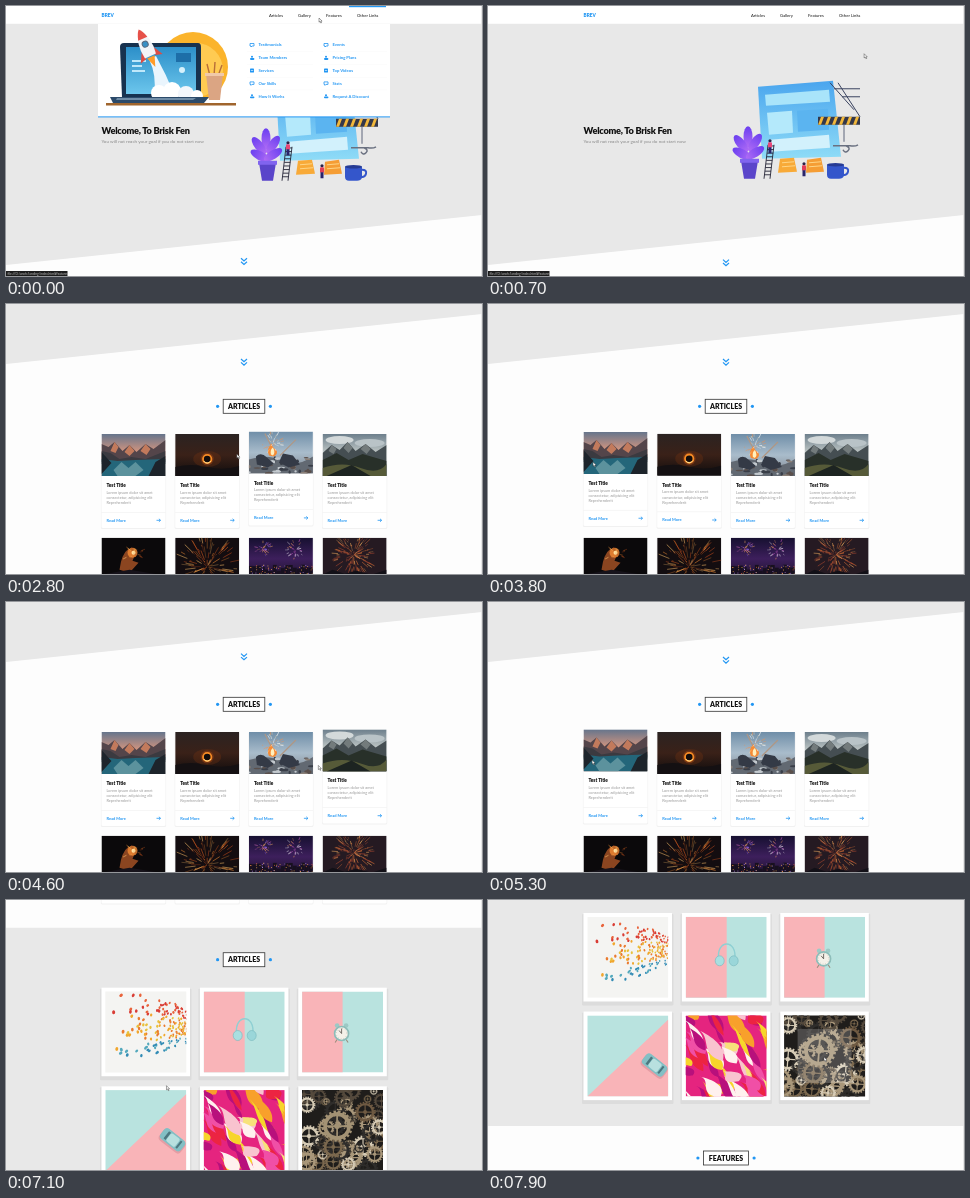
Write an HTML page that moves like this. It is 476 px wide and 270 px high and loops after 8000 ms.

```html
<!DOCTYPE html>
<html lang="en">
<head>
<meta charset="utf-8">
<title>Landing page tour</title>
<style>
html, body { margin: 0; width: 100%; height: 100%; overflow: hidden; background: #fdfdfd; }
svg { display: block; }
#stage { width: 100vw; height: 100vh; }
text { font-family: Lato, "Open Sans", sans-serif; }
</style>
</head>
<body>
<svg id="stage" viewBox="0 0 476 270"></svg>
<script>
const LOOP = 8000, BLUE = '#2196f3';
const PINK = '#f9b4b8', MINT = '#b9e3df';

let seed = 7;
const rnd = (a = 1, b = 0) => {
  seed = (seed * 16807) % 2147483647;
  return b + (a - b) * seed / 2147483647;
};
const pick = list => list[Math.floor(rnd(list.length))];
const times = (n, fn) => Array.from({ length: n }, (_, i) => fn(i)).join('');
const clamp = v => Math.max(0, Math.min(1, v));
const smooth = v => { v = clamp(v); return v * v * (3 - 2 * v); };

const rect = (x, y, w, h, fill, more = '') =>
  `<rect x="${x}" y="${y}" width="${w}" height="${h}" fill="${fill}" ${more}/>`;
const circle = (x, y, r, fill, more = '') =>
  `<circle cx="${x}" cy="${y}" r="${r}" fill="${fill}" ${more}/>`;
const oval = (x, y, rx, ry, fill, more = '') =>
  `<ellipse cx="${x}" cy="${y}" rx="${rx}" ry="${ry}" fill="${fill}" ${more}/>`;
const path = (d, fill, more = '') => `<path d="${d}" fill="${fill}" ${more}/>`;
const line = (d, stroke, w = 1, more = '') =>
  path(d, 'none', `stroke="${stroke}" stroke-width="${w}" ${more}`);
const text = (x, y, size, str, fill = '#111', more = '') =>
  `<text x="${x}" y="${y}" font-size="${size}" fill="${fill}" ${more}>${str}</text>`;
const BOLD = 'font-weight="700"', BLACK = 'font-weight="900"';
const group = (id, body) => `<g id="${id}">${body}</g>`;
const gradient = (id, ...stops) => `<linearGradient id="${id}" x2="0" y2="1">` +
  stops.map((c, i) => `<stop offset="${i / (stops.length - 1)}" stop-color="${c}"/>`).join('') +
  '</linearGradient>';

const defs = `<defs>${
  gradient('dusk', '#66758c', '#e59a7c', '#a8604f')}${
  gradient('cloud', '#6d7f8c', '#c9cfcc', '#6f7f80')}${
  gradient('frost', '#6f8ea8', '#a9bccb', '#80868e')}${
  gradient('ember', '#2b2322', '#3a2118', '#0f0c0d')}${
  gradient('night', '#161030', '#3d1f5c', '#1a1226')}${
  gradient('glass', '#4aa5ee', '#8fdcf7')}${
  gradient('screen', '#2c8fc9', '#6cc6ec')}${
  gradient('leaf', '#6a3ff0', '#b06cf5')}</defs>`;

// Pictures for the article cards, each 64 x 42
const sparks = (cx, cy, n, r, colors) => times(n, () => {
  const a = rnd(6.283), r0 = rnd(r * .7), r1 = r0 + rnd(r * .35, 1);
  const c = Math.cos(a), s = Math.sin(a);
  return line(`M${cx + c * r0} ${cy + s * r0}L${cx + c * r1} ${cy + s * r1}`, pick(colors), rnd(.6, .25));
});
const FIRE = ['#f08a32', '#d95d1f', '#ffc26b', '#a8431c'];

const lake = () => rect(0, 0, 64, 42, 'url(#dusk)') +
  path('M0 10L7 13 13 8 21 17 28 11 35 18 44 10 52 15 64 6V28H0Z', '#54454a') +
  path('M13 8L17 13 14 19 9 17ZM28 11L33 17 28 22 23 18ZM44 10L49 15 45 21 39 17Z', '#c27a5c') +
  path('M0 17L9 19 18 25 30 23 44 25 64 17V30H0Z', '#3b3a40') +
  path('M0 25L16 27 34 26 64 25V42H0Z', '#24667a') +
  path('M12 36L20 28 27 34 34 28 42 36 34 42H16Z', '#6fa0a8', 'opacity=".75"') +
  path('M64 22L54 28 47 42H64ZM0 18L10 29 0 40Z', '#1d242b');
const eclipse = () => rect(0, 0, 64, 42, 'url(#ember)') +
  path('M0 33Q16 29 32 33T64 32V42H0Z', '#141012') +
  oval(32, 25, 14, 8, '#7a3512', 'opacity=".3"') + circle(32, 25, 6.5, '#9a4515', 'opacity=".5"') +
  circle(32, 25, 4.2, '#120c0b', 'stroke="#f58a24" stroke-width="1.8"') +
  line('M28.5 27A4 4 0 0 0 35.5 27', '#ffdf94', 1);
const camp = () => rect(0, 0, 64, 42, 'url(#frost)') +
  path('M0 28Q18 22 33 29T64 25V42H0Z', '#626972') +
  times(40, () => oval(rnd(64), rnd(42, 24), rnd(4, 1), rnd(2, .7), pick(['#393e48', '#8b8078', '#c3c9ce', '#5a4f4b']))) +
  path('M7 25Q12 20 18 26L25 32 19 36 8 33ZM34 22L44 24 51 33 40 36 30 31Z', '#343a46') +
  line('M16 2L25 20M47 8L31 24', '#b09784', 1.2) +
  path('M20 24Q17 17 23 12 23 16 27 18 30 22 25 25Z', '#f58b35') +
  path('M22 23Q21 18 24 16 27 21 24 24Z', '#fff0be') + sparks(24, 12, 30, 14, ['#ffe2b8', '#f68d45', '#fff']);
const hills = () => rect(0, 0, 64, 42, 'url(#cloud)') +
  oval(17, 6, 14, 4, '#d3d9da') + oval(47, 9, 15, 4, '#b9c3c7') +
  path('M0 19L9 11 17 16 25 8 33 17 43 10 53 18 64 11V42H0Z', '#454e52') +
  path('M9 11L14 15 11 20 6 17ZM25 8L30 14 26 19 21 14ZM43 10L48 15 44 20 38 15Z', '#737b7c') +
  path('M0 26L14 19 26 26 40 20 64 27V42H0Z', '#283029') +
  path('M0 34Q20 27 38 34T64 30V42H0Z', '#565a38') + path('M4 42L29 31 48 42Z', '#1d2421');
const hand = () => rect(0, 0, 64, 42, '#0b090b') +
  path('M18 32Q20 16 27 11L34 16 31 23 37 25 28 35Z', '#8b4520') +
  circle(31, 15, 5, '#f28a35', 'opacity=".8"') + circle(32, 15, 2, '#ffe1a0') + sparks(32, 16, 16, 13, FIRE) +
  path('M0 37L28 32 64 38V42H0Z', '#17131b');
const streaks = () => rect(0, 0, 64, 42, '#130d10') + sparks(32, 29, 110, 38, FIRE);
const city = () => rect(0, 0, 64, 42, 'url(#night)') +
  sparks(14, 11, 28, 11, ['#e46fc3', '#ffb15e', '#8c67e8']) +
  sparks(47, 12, 32, 12, ['#f7a25f', '#d25aca', '#fff']) +
  times(16, i => rect(i * 4, rnd(34, 27), 3.8, 16, '#17101f')) +
  times(70, () => rect(rnd(64), rnd(38, 27), .8, .8, pick(['#ffb54d', '#e96545', '#b889e8'])));
const burst = () => rect(0, 0, 64, 42, '#251a22') + sparks(31, 17, 120, 25, ['#e77738', '#ffb765', '#b74c32']) +
  path('M0 37L10 32 22 36 34 33 49 37 64 32V42H0Z', '#121017');

// Pictures for the gallery, each 81 x 81
const confetti = () => rect(0, 0, 81, 81, '#f4f4f2') + times(210, () => {
  const u = rnd() ** .38, v = rnd();
  const x = 2 + 79 * u, y = (4 + 13 * u * u) * (1 - v) + (78 - 30 * u) * v, r = 2 - 1.1 * u;
  const color = pick(v < .3 ? ['#d93c35', '#e9643c'] : v < .8 ? ['#f1a62d', '#e8c13c', '#ea7b30'] : ['#328bb5', '#54a9bd']);
  return oval(x, y, r * .75, r, color, `transform="rotate(${rnd(50, -20)} ${x} ${y})"`);
});
const split = x => rect(0, 0, 81, 81, MINT) + rect(0, 0, x, 81, PINK);
const headphones = () => split(41) +
  line('M33 43C30 22 52 22 49 43', '#8fd0d3', 1.4) +
  oval(34, 44, 4.5, 5, '#a9dfe0', 'stroke="#7dbcc0" stroke-width=".7"') +
  oval(48, 44, 4.5, 5, '#9ad6d9', 'stroke="#7dbcc0" stroke-width=".7"');
const clock = () => split(40.5) + line('M35 48L33 51M44 48L46 51', '#9b8c7c', 1.1) +
  circle(35, 34, 2.3, '#9dc9c5') + circle(44, 34, 2.3, '#9dc9c5') +
  circle(39.5, 42, 7, '#f4f1e9', 'stroke="#8dbdb9" stroke-width="1.7"') +
  circle(39.5, 42, 5.3, 'none', 'stroke="#94897c" stroke-width=".6" stroke-dasharray=".5 2.3"') +
  line('M37 39L39.5 42V37', '#554d48', .8);
const car = () => rect(0, 0, 81, 81, MINT) + path('M0 81L81 4V81Z', PINK) +
  `<g transform="translate(67 50) rotate(38)">${rect(-13, -6, 27, 14, '#d58b94', 'rx="4" opacity=".55"') +
  rect(-13, -7, 26, 13, '#83bfc4', 'rx="4"') + rect(-5, -5.5, 11, 10, '#b8e0df', 'rx="2"') +
  rect(-8, -5, 2.5, 9, '#4c777f') + rect(7, -5, 2, 9, '#4c777f')}</g>`;
const paint = () => rect(0, 0, 81, 81, '#e5247f') + times(60, () => {
  const x = rnd(85, -10), y = rnd(75, -15), w = rnd(13, 3), h = rnd(40, 12);
  return path(`M${x} ${y}c${w} ${h * .3} ${-w} ${h * .6} ${w} ${h}c${w} ${-h * .3} 0 ${-h * .7} ${-w} ${-h}`,
    pick(['#f7d52b', '#f8a02b', '#f04fa6', '#b8107c', '#fff1ee', '#f9c3cf', '#ec2442', '#f7e27a']),
    `transform="rotate(-24 ${x} ${y})"`);
});
const gear = (x, y, r, c) =>
  circle(x, y, r, 'none', `stroke="${c}" stroke-width="${r * .3}"`) +
  circle(x, y, r * 1.2, 'none', `stroke="${c}" stroke-width="${r * .22}" stroke-dasharray="${r * .2} ${r * .18}"`) +
  circle(x, y, r * .25, c) + line(`M${x - r} ${y}H${x + r}M${x} ${y - r}V${y + r}`, c, r * .14);
const gears = () => rect(-8, -8, 97, 97, '#1f1d1b') +
  times(46, () => gear(rnd(81), rnd(81), rnd(9, 2.5), pick(['#7b684e', '#a9977a', '#554a3d', '#d6cbb5', '#2f2d2b']))) +
  gear(35, 36, 12, '#a39274') + gear(63, 22, 8, '#6f5a42');

// Page layout
const cards = [lake, eclipse, camp, hills, hand, streaks, city, burst].map((art, i) =>
  ({ art, id: 'card' + i, x: 95.5 + 73.7 * (i % 4), y: 329 + 103.7 * (i >> 2), w: 64, h: 94 }));
const photos = [confetti, headphones, clock, car, paint, gears].map((art, i) =>
  ({ art, id: 'photo' + i, x: 95.5 + 98.4 * (i % 3), y: 611 + 98.6 * (i / 3 | 0), w: 88.5, h: 88.5 }));

const cardSvg = ({ art, id, x, y, w, h }) => group(id,
  rect(x - .6, y, w + 1.2, h + 1, '#f1f1f1', 'rx="1.5"') + rect(x, y, w, h, '#fff', 'rx="1.5"') +
  `<svg x="${x}" y="${y}" width="64" height="42">${art()}</svg>` +
  text(x + 5, y + 53, 4.7, 'Test Title', '#111', BLACK) +
  ['Lorem ipsum dolor sit amet', 'consectetur, adipisicing elit', 'Reprehenderit']
    .map((s, i) => text(x + 5, y + 59.7 + i * 5.1, 3.9, s, '#999')).join('') +
  rect(x, y + 78, w, .4, '#e8e8e8') +
  text(x + 5, y + 87.6, 4, 'Read More', BLUE, BOLD) +
  line(`M${x + 55} ${y + 86.3}h4m-1.6-1.5l1.6 1.5-1.6 1.5`, BLUE, .8));

const photoSvg = ({ art, id, x, y, w, h }) =>
  rect(x - 1.5, y + 1, w + 3, h + 3, '#dcdcdc', 'rx="1"') + rect(x, y, w, h, '#fff') +
  `<svg x="${x + 3.8}" y="${y + 3.8}" width="81" height="81">${group(id, art())}
  ${rect(0, 0, 0, 0, '#fff', `id="${id}flash"`)}</svg>`;

const heading = (y, str, half = 20.8) =>
  rect(238 - half, y - 7, half * 2, 14, '#fff', 'stroke="#333" stroke-width=".8"') +
  text(238, y + 2.6, 7, str, '#111', BLACK + ' text-anchor="middle"') +
  circle(238 - half - 5.6, y, 1.6, BLUE) + circle(238 + half + 5.6, y, 1.6, BLUE);

const person = (x, y, shirt) => circle(x, y, 1.6, '#2a2146') +
  rect(x - 2, y + 1.5, 4, 5.5, shirt, 'rx="1"') + rect(x - 1.5, y + 6.5, 3, 6, '#29246b');

const hero = path('M270 82L345 76 353 152 274 154Z', 'url(#glass)') +
  path('M277 90L341 85 342 97 278 101Z', '#a9e4fa') +
  path('M279 108L304 106 305 128 281 130Z', '#b4e9fb') + path('M309 106L340 104 341 125 310 127Z', '#5bb4f0') +
  path('M282 135L341 130 342 143 283 147Z', '#d2f1fc') +
  line('M342 78L366 105M350 78L372 112M346 84L372 84M354 92L372 92', '#3b4460', 1) +
  rect(330, 112, 42, 8, '#35384a') +
  times(6, i => path(`M${333 + i * 7} 112h3l-3 8h-3Z`, '#f2b83c')) +
  line('M356 120V137', '#3b4460', .8) +
  line('M345 141H362q5 1 8-1M358 141q5 2 2 5t-5-1', '#6a7080', 1.5) +
  [[260, 132, 0], [253, 139, -38], [267, 138, 35], [254, 149, -62], [267, 148, 58]].map(([x, y, a]) =>
    oval(x, y, 4.5, 10.5, 'url(#leaf)', `transform="rotate(${a} ${x} ${y})"`)).join('') +
  path('M253 156H270L267 174H256Z', '#5a45ca') + rect(252, 154, 19, 4, '#8064ef') +
  line('M276 174L280 140M282 174L286 140' + times(9, i => `M${276.5 + i * .45} ${170 - i * 3.6}h6`), '#252537', .9) +
  person(282, 136, '#e84878') +
  path('M292 154L306 153 309 167 290 168Z', '#f8aa38') + path('M319 155L333 153 336 167 318 168Z', '#f59d34') +
  line('M294 158L306 157M294 162L307 161M321 158L333 157M321 162L334 161', '#ffd585', 1) +
  person(316, 159, '#e13d58') +
  path('M339 160H356V171Q355 174 351 174H343Q339 174 339 170Z', '#3456cb') +
  line('M356 163q5 0 4 4t-5 3', '#3456cb', 2) + oval(347.5, 160, 8.5, 1.7, '#263b94');

const launch = circle(187, 61, 35, '#fbb42c') + circle(190, 64, 27, '#ffcb52') +
  path('M118 37H192Q195 37 195 41V91H116L114 41Q114 37 118 37Z', '#17324f') +
  rect(120, 41, 70, 47, 'url(#screen)') +
  rect(126, 54, 14, 2, '#bfe8fa') + rect(126, 59, 10, 2, '#bfe8fa') + rect(126, 64, 13, 2, '#bfe8fa') +
  rect(170, 47, 15, 9, '#1d6ea8') + circle(176, 64, 3, '#d6f1fc') +
  path('M148 88Q151 70 143 53L150 50Q160 68 168 88Z', '#eaf5fd') +
  circle(153, 87, 8, '#fff') + circle(166, 85, 9, '#fff') + circle(180, 88, 8, '#f3f7fc') + circle(191, 90, 6, '#fff') +
  path('M104 91H203L198 97H107Z', '#2b4a6a') + path('M111 92H190L187 94H110Z', '#6f8ca6') +
  rect(100, 97, 130, 2.5, '#a0652d') +
  `<g transform="translate(140 40) rotate(-24)">${path('M-6 3L-12 14-5 12ZM6 3L12 14 5 12Z', '#dc4d45') +
  path('M-6 11Q-9-6 0-18 9-6 6 11Z', '#f3f4f8') + path('M-5-8Q-3-15 0-18 3-15 5-8Z', '#e65149') +
  circle(0, -2, 3, '#388fc5', 'stroke="#54657b"') + path('M-4 12H4L0 23Z', '#ff9b27')}</g>` +
  line('M204 70L201 58M208 70L209 56M212 70L216 59', '#b86e38', 1.4) +
  path('M200 68H217L214 94H203Z', '#dba583') + rect(199, 67, 19, 3, '#f0c9aa');

const icons = (x, y, i) => i % 3 === 0 ? line(`M${x} ${y - 1.5}h4v2.5h-2l-1 1v-1h-1z`, BLUE, .8)
  : i % 3 === 1 ? circle(x + 2, y - 1, 1, BLUE) + rect(x, y + .3, 4.4, 1.8, BLUE, 'rx=".8"')
  : rect(x, y - 2, 4, 4, BLUE, 'rx=".7"') + rect(x + .8, y - .3, 2.4, .6, '#fff');
const column = (x, labels) => labels.map((label, i) => {
  const y = 39 + i * 12.8;
  return icons(x, y, i) + text(x + 8.5, y + 1.4, 4.2, label, BLUE, BOLD) +
    (i < 4 ? rect(x - 3, y + 6.4, 66, .3, '#f6f6f6') : '');
}).join('');

const menu = rect(92, 18, 292, 93, '#fff') + rect(92, 110.4, 292, 1, BLUE) + launch +
  column(244, ['Testimonials', 'Team Members', 'Services', 'Our Skills', 'How It Works']) +
  column(318, ['Events', 'Pricing Plans', 'Top Videos', 'Stats', 'Request A Discount']);

const header = rect(0, 0, 476, 17.8, '#fff') + text(95.5, 10.6, 4.7, 'BREV', BLUE, BLACK) +
  [[263, 'Articles'], [292, 'Gallery'], [320, 'Features'], [351, 'Other Links']]
    .map(([x, s]) => text(x, 10.5, 4.2, s)).join('') +
  rect(313, 0, 0, 1.2, BLUE, 'id="featuresBar"') + rect(343, 0, 37, 1.2, BLUE, 'id="linksBar"');

document.getElementById('stage').innerHTML = defs + rect(0, 0, 476, 270, '#fdfdfd') + group('page',
  path('M0 0H476V209L0 259Z', '#e8e8e8') +
  text(95.5, 128.3, 9.2, 'Welcome, To Brisk Fen', '#111', BLACK + ' letter-spacing="-.25"') +
  text(95.5, 136.6, 4.6, 'You will not reach your goal if you do not start now', '#888') +
  group('hero', hero) + header + group('menu', menu) +
  group('chevron', line('M235 254l3 2.7 3-2.7m-6 3.4l3 2.7 3-2.7', BLUE, 1.2)) +
  heading(301.3, 'ARTICLES') + cards.map(cardSvg).join('') +
  rect(0, 551, 476, 273, '#e8e8e8') + heading(583, 'ARTICLES') + photos.map(photoSvg).join('') +
  heading(856, 'FEATURES', 22.5)) +
  rect(475.2, 0, .8, 270, '#e2e2e2') +
  group('status', rect(0, 265, 61.5, 5, '#1d1d1d') +
    text(1.5, 268.7, 3.2, 'file:///D:/work/landing/index.html#features', '#bbb')) +
  group('cursor', path('M0 0V4.2L1 3.3 1.8 5 2.5 4.7 1.8 3.1H3.1Z', '#fff', 'stroke="#333" stroke-width=".45"'));

// Motion
const scrolls = [[900, 1400, 124], [1700, 2150, 75], [5310, 5980, 249], [6700, 7500, 150]];
const scrollAt = t => scrolls.reduce((sum, [a, b, d]) => sum + d * smooth((t - a) / (b - a)), 0);

const trail = [
  [0, 313, 12], [300, 318, 13], [900, 405, 65], [1400, 419, 78], [2000, 419, 78], [2400, 280, 160],
  [2740, 250, 152], [2800, 231, 150], [2950, 210, 155], [3200, 345, 165], [3320, 340, 165],
  [3500, 200, 162], [3600, 158, 160], [3800, 105, 158], [3950, 112, 160], [4350, 345, 165],
  [4550, 340, 164], [4900, 150, 160], [5100, 105, 158], [5320, 104, 158], [5600, 84, 133],
  [6700, 81, 131], [7250, 190, 206], [7600, 315, 212], [7710, 327, 195], [7900, 336, 157], [8000, 337, 156]
];
const cursorAt = t => {
  const i = trail.findIndex(k => k[0] > t);
  if (i < 1) return trail[i ? trail.length - 1 : 0].slice(1);
  const [t0, x0, y0] = trail[i - 1], [t1, x1, y1] = trail[i], u = (t - t0) / (t1 - t0);
  return [x0 + (x1 - x0) * u, y0 + (y1 - y0) * u];
};
const isOver = (box, t) => {
  const [x, y] = cursorAt(t), py = y + scrollAt(t);
  return x > box.x && x < box.x + box.w && py > box.y && py < box.y + box.h;
};
// Share of the last span spent over a box, which stands in for a CSS transition
const dwell = (box, t, span) => {
  let hits = 0;
  for (let i = 0; i < 24; i++) hits += isOver(box, t - span * i / 24);
  return hits / 24;
};
const bounce = t => {
  const p = ((t + 440) % 1500) / 1500;
  const hop = c => smooth(1 - Math.abs(p - c) / (p < .5 ? (p < c ? .2 : .1) : (p < c ? .1 : .2)));
  return -3.7 * (p < .5 ? hop(.4) : hop(.6));
};

const $ = id => document.getElementById(id);
const set = (id, attrs) => { for (const k in attrs) $(id).setAttribute(k, attrs[k]); };
const move = (id, x, y) => set(id, { transform: `translate(${x} ${y})` });

function draw(t) {
  move('page', 0, -scrollAt(t));
  move('hero', 0, 1.5 - 12.4 * (1 - Math.abs(((t + 4850) % 5000) / 2500 - 1)));
  move('chevron', 0, bounce(t));
  move('cursor', ...cursorAt(t));

  const close = smooth((t - 60) / 300);
  move('menu', 0, 12.4 * close);
  set('menu', { opacity: 1 - close });
  set('linksBar', { width: 37 * (1 - close) });
  set('featuresBar', { width: 30 * close * (1 - smooth((t - 400) / 300)) });
  set('status', { opacity: t < 950 ? 1 : 0 });

  for (const card of cards) move(card.id, 0, -2.6 * smooth(dwell(card, t, 300)));
  for (const photo of photos) {
    const zoom = smooth(dwell(photo, t, 300)), flash = isOver(photo, t) ? dwell(photo, t, 700) : 0;
    const size = 162 * flash;
    set(photo.id, { transform: `translate(40.5 40.5) rotate(${5 * zoom}) scale(${1 + .1 * zoom}) translate(-40.5 -40.5)` });
    set(photo.id + 'flash', {
      x: 40.5 - size / 2, y: 40.5 - size / 2, width: size, height: size,
      opacity: .2 * clamp((1 - flash) / .6)
    });
  }
}

const start = performance.now();
(function frame() {
  draw((performance.now() - start) % LOOP);
  requestAnimationFrame(frame);
})();
</script>
</body>
</html>
```
